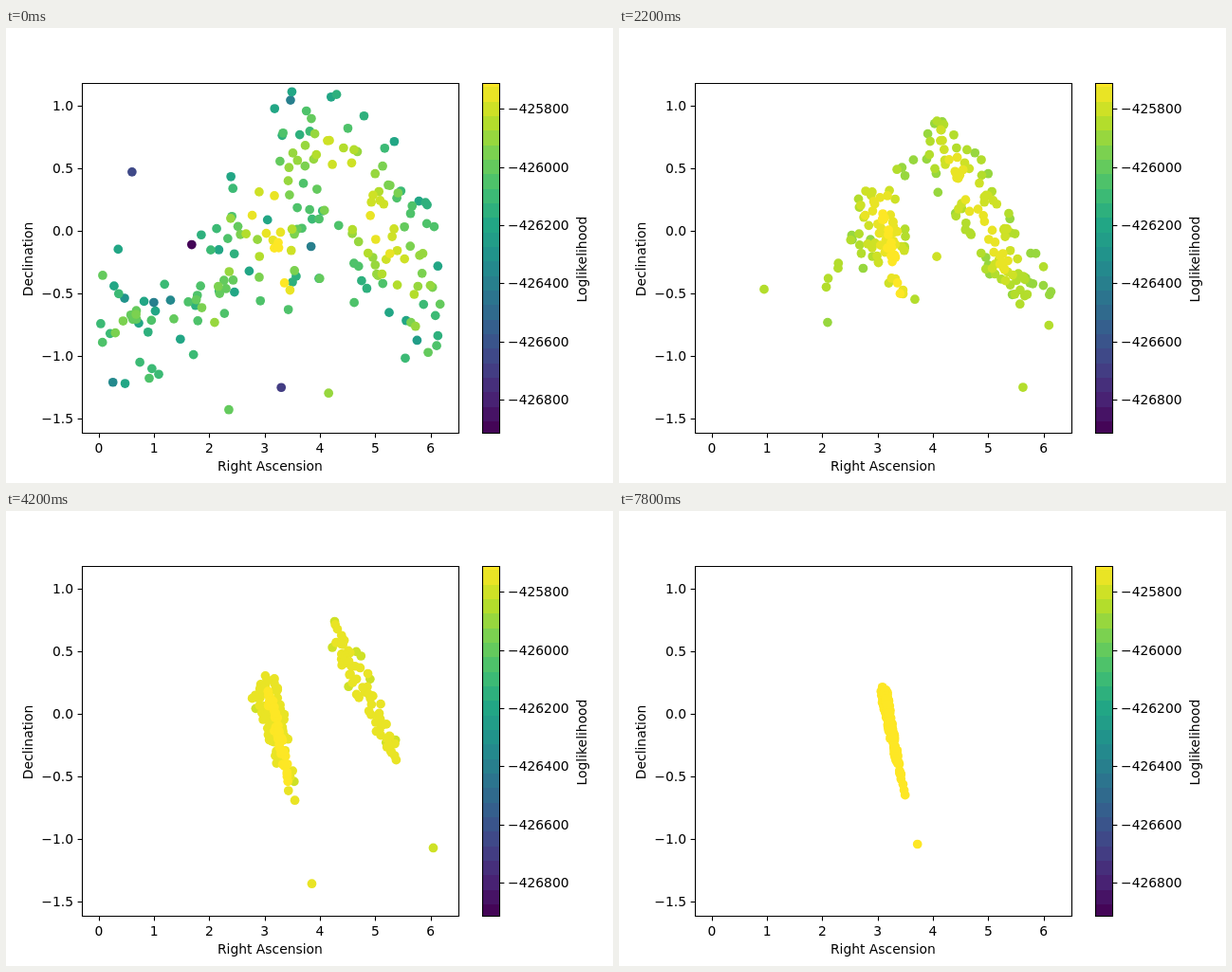
These frames come from a looping animation (640 px wide and 480 px high, 8000 ms). An HTML page:

```html
<!DOCTYPE html>
<html lang="en">
<head>
<meta charset="utf-8">
<title>Live points</title>
<style>
  html, body { margin: 0; width: 100%; height: 100%; overflow: hidden; background: #fff; }
  svg { display: block; width: 640px; height: 480px; }
  text { font: 13.89px "DejaVu Sans", sans-serif; fill: #000; }
  .line { fill: none; stroke: #000; stroke-width: 1.11; }
</style>
</head>
<body>
<svg viewBox="0 0 640 480">
  <clipPath id="axes"><rect x="80" y="58" width="397" height="369"/></clipPath>
  <g id="points" clip-path="url(#axes)"></g>
  <g id="frame"></g>
</svg>
<script>
const STEP = 200, STEPS = 40, LIVE = 200, BEST = 425712;
const X = ra => 97.9 + 58.28 * ra;
const Y = dec => 214 - 132.2 * dec;
const barY = v => 85.2 + (v - 425800) * 0.3068;

// Viridis, quantised to bands of 50
const VIRIDIS = '440154 482475 414487 355f8d 2a788e 21918c 22a884 44bf70 7ad151 bddf26 fde725'
  .split(' ').map(h => [0, 2, 4].map(i => parseInt(h.substr(i, 2), 16)));

function color(value) {
  const v = Math.round(value / 50) * 50;
  const t = Math.min(1, Math.max(0, (426912 - v) / 1200)) * 10;
  const i = Math.min(9, Math.floor(t));
  const mix = VIRIDIS[i].map((c, j) => Math.round(c + (VIRIDIS[i + 1][j] - c) * (t - i)));
  return `rgb(${mix})`;
}

let seed = 20177;
function rand() {
  seed = (seed + 0x6D2B79F5) | 0;
  let t = Math.imul(seed ^ (seed >>> 15), 1 | seed);
  t = (t + Math.imul(t ^ (t >>> 7), 61 | t)) ^ t;
  return ((t ^ (t >>> 14)) >>> 0) / 4294967296;
}

// Worst depth below the peak that is still alive at a step
const limit = step => 575 * Math.exp(-0.075 * step);

// Depth of the three structures: sky ring, main streak, second mode
const offRing = (x, y) => Math.abs(y + 0.1 + 0.75 * Math.cos(x - 0.95));

function ring(x, y) {
  return (x < 2 ? 290 : 230) + 700 * offRing(x, y);
}
function streak(x, y) {
  const d = x - (3.2 - 0.4 * y + 0.1 * y * y), e = y - 0.1;
  return Math.abs(d) * ((d < 0 ? 330 : 600) + 400 * offRing(x, y)) + (e > 0 ? 1200 : 40) * e * e;
}
function arch(x, y) {
  const d = Math.abs(x - 4.98 + 1.04 * y), e = y - 0.05;
  return 38 + d * (330 + 250 * offRing(x, y)) + (e > 0 ? 90 * e ** 2 + 400 * e ** 6 : 400 * e * e);
}

function point(x, y, depth, from, to = STEPS) {
  return { x, y, depth, from, to, loss: depth * depth / (depth + 90) };
}

function sample(step) {
  const max = limit(step);
  if (rand() < 0.1 * Math.exp(-step / 8)) {
    return point(rand() * 6.2, rand() * 1.6 - 1.5, max * (0.4 + 0.6 * rand()), step);
  }
  for (;;) {
    const x = rand() * 6.2, y = rand() * 2.75 - 1.55;
    const a = streak(x, y), b = arch(x, y), c = ring(x, y);
    const best = Math.min(a, b, c);
    const depth = best * (0.8 + 0.4 * rand());
    if (depth > max) continue;
    const core = step ? 0.7 * Math.exp(-a / 70) : 0;
    const weight = best === a ? (0.3 + core) * Math.exp(-((y + 0.05) ** 2) / 0.16) : 0.25;
    if (rand() > weight) continue;
    return point(x, y, !step && rand() < 0.2 ? depth * 1.35 : depth, step);
  }
}

function simulate() {
  // Early dark outliers and late isolated survivors
  const all = [
    point(1.68, -0.11, 1280, 0, 1), point(0.6, 0.47, 1040, 0, 1), point(3.3, -1.25, 1070, 0, 1),
    point(6.05, -1.07, 145, 20, 31), point(0, -1.37, 0, 22, 38), point(3.72, -1.04, 0, 22)
  ];
  const live = Array.from({ length: LIVE }, () => sample(0));
  all.push(...live);
  for (let step = 1; step < STEPS; step++) {
    live.forEach((p, i) => {
      if (p.depth <= limit(step)) return;
      p.to = step;
      all.push(live[i] = sample(step));
    });
  }
  return all.sort((a, b) => b.loss - a.loss);
}

function drawFrame() {
  const out = [];
  const line = d => out.push(`<path class="line" d="${d}"/>`);
  const text = (s, x, y, anchor, extra = '') =>
    out.push(`<text x="${x}" y="${y}" text-anchor="${anchor}" ${extra}>${s}</text>`);
  const upright = (s, x) => text(s, x, 244, 'middle', `transform="rotate(-90 ${x} 244)"`);
  const snap = v => Math.round(v) + 0.5;

  for (let v = 425700; v <= 426900; v += 50) {
    const top = Math.max(58, barY(v - 25)), end = Math.min(428, barY(v + 25) + 0.5);
    out.push(`<rect x="502" y="${top}" width="18.5" height="${end - top}" fill="${color(v)}" shape-rendering="crispEdges"/>`);
  }
  line('M80.5 58.5H477.5V427.5H80.5Z');
  line('M502.5 58.5H520.5V427.5H502.5Z');

  for (let i = 0; i <= 6; i++) {
    line(`M${snap(X(i))} 427.5v4.9`);
    text(i, X(i), 448, 'middle');
  }
  for (let i = -3; i <= 2; i++) {
    line(`M80.5 ${snap(Y(i / 2))}h-4.9`);
    text((i < 0 ? '−' : '') + Math.abs(i / 2).toFixed(1), 71, Math.round(Y(i / 2) + 5), 'end');
  }
  for (let v = 425800; v <= 426800; v += 200) {
    line(`M520.5 ${snap(barY(v))}h4.9`);
    text('−' + v, 529, Math.round(barY(v) + 5), 'start');
  }
  text('Right Ascension', 278.4, 467, 'middle');
  upright('Declination', 28);
  upright('Loglikelihood', 612);
  document.getElementById('frame').innerHTML = out.join('');
}

const history = simulate();
const layer = document.getElementById('points');
let shown = -1;

function render(time) {
  const step = Math.floor(time / STEP) % STEPS;
  if (step === shown) return;
  shown = step;
  layer.innerHTML = history
    .filter(p => p.from <= step && step < p.to)
    .map(p => `<circle cx="${X(p.x).toFixed(2)}" cy="${Y(p.y).toFixed(2)}" r="4.86" fill="${color(BEST + p.loss)}"/>`)
    .join('');
}

drawFrame();
render(0);
const start = performance.now();
(function tick() {
  render(performance.now() - start);
  requestAnimationFrame(tick);
})();
</script>
</body>
</html>
```
